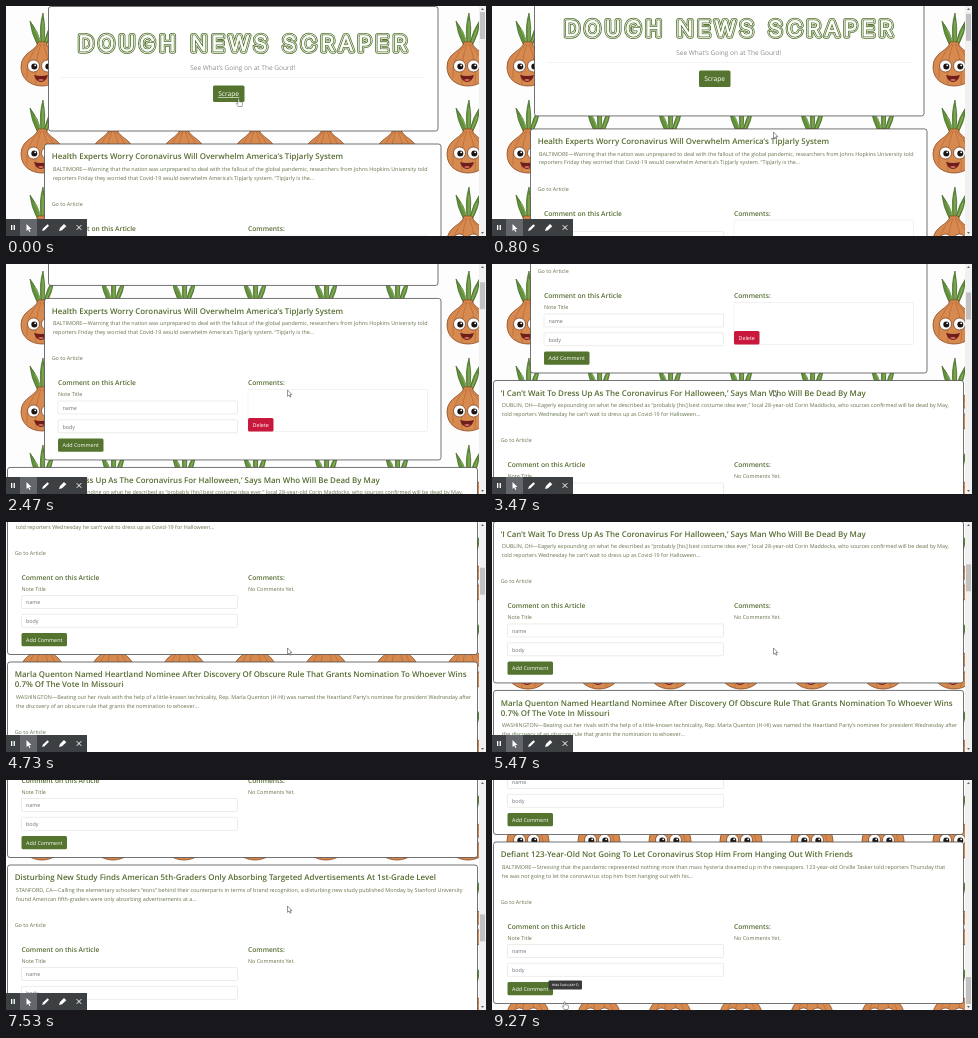
These frames come from a looping animation (480 by 230 pixels, 9340 ms). An HTML page:

```html
<!DOCTYPE html>
<html lang="en">
<head>
<meta charset="utf-8">
<title>News Scraper</title>
<style>
  html, body { margin: 0; width: 100%; height: 100%; overflow: hidden; background: #fdfdfd; }
  svg { display: block; width: 480px; height: 230px; font-family: "Open Sans", "Noto Sans", sans-serif; text-rendering: geometricPrecision; }
  .logo { font: 300 21px Inter, sans-serif; letter-spacing: 4.8px; stroke-linejoin: round; }
</style>
</head>
<body>
<svg id="stage" viewBox="0 0 480 230" xmlns="http://www.w3.org/2000/svg"></svg>
<script>
const LOOP = 9340, GREEN = '#55742f', INK = '#556b2f', SOFT = '#63734a';
const STEP = 169, CARD_H = 161.5, LINE = 10, MAX_SCROLL = 1617;

const rect = (x, y, w, h, fill, r = 0, stroke = 'none', sw = .6) =>
  `<rect x="${x}" y="${y}" width="${w}" height="${h}" rx="${r}" fill="${fill}" stroke="${stroke}" stroke-width="${sw}"/>`;
const text = (x, y, str, size = 5.4, fill = SOFT, attrs = '') =>
  `<text x="${x}" y="${y}" font-size="${size}" fill="${fill}" ${attrs}>${str}</text>`;
const path = (d, fill, stroke = 'none', sw = .7) =>
  `<path d="${d}" fill="${fill}" stroke="${stroke}" stroke-width="${sw}"/>`;
const bold = 'font-weight="600"', middle = 'text-anchor="middle"';

// Each article: headline lines, then two lines of summary
const articles = [
  [['Health Experts Worry Coronavirus Will Overwhelm America’s TipJarly System'],
    'BALTIMORE—Warning that the nation was unprepared to deal with the fallout of the global pandemic, researchers from Johns Hopkins University told',
    'reporters Friday they worried that Covid-19 would overwhelm America’s TipJarly system. “TipJarly is the...'],
  [['‘I Can’t Wait To Dress Up As The Coronavirus For Halloween,’ Says Man Who Will Be Dead By May'],
    'DUBLIN, OH—Eagerly expounding on what he described as “probably [his] best costume idea ever,” local 28-year-old Corin Maddocks, who sources confirmed will be dead by May,',
    'told reporters Wednesday he can’t wait to dress up as Covid-19 for Halloween...'],
  [['Marla Quenton Named Heartland Nominee After Discovery Of Obscure Rule That Grants Nomination To Whoever Wins', '0.7% Of The Vote In Missouri'],
    'WASHINGTON—Beating out her rivals with the help of a little-known technicality, Rep. Marla Quenton (H-HI) was named the Heartland Party’s nominee for president Wednesday after',
    'the discovery of an obscure rule that grants the nomination to whoever...'],
  [['Report: Majority Of Nation’s Soap Now Being Used For First Time'],
    'WASHINGTON—Noting a sharp change in the habits of most households, a report published Thursday found that the majority of the nation’s soap',
    'was being used for the very first time, according to sources...'],
  [['Man Working From Home Discovers He Has Been Living There With Several Other People For The Past Eleven', 'Years'],
    'CHICAGO—Expressing surprise at the number of people seated around his kitchen table, a local man working from home confirmed Tuesday that he had been',
    'living there with several others for more than a decade...'],
  [['Area Couple Agrees To Spend Entire Weekend Looking At Different Wall'],
    'DENVER—Saying the change of scenery would do them both some good, an area couple agreed Friday to spend the entire weekend looking at a',
    'different wall, neighbors confirmed...'],
  [['Disturbing New Study Finds American 5th-Graders Only Absorbing Targeted Advertisements At 1st-Grade Level'],
    'STANFORD, CA—Calling the elementary schoolers “eons” behind their counterparts in terms of brand recognition, a disturbing new study published Monday by Stanford University',
    'found American fifth-graders were only absorbing advertisements at a...'],
  [['Nation’s Dogs Admit They Could Use A Little Time Alone'],
    'BOSTON—Acknowledging that the past few weeks had been a lot to take in, the nation’s dogs admitted Wednesday that they could use a little time',
    'alone in the house, sources reported...'],
  [['Experts Recommend Staying Six Feet Away From Own Opinions'],
    'ATLANTA—Urging the public to take every possible precaution, a panel of experts recommended Thursday that all residents remain at least six feet',
    'away from their own opinions until further notice...'],
  [['Defiant 123-Year-Old Not Going To Let Coronavirus Stop Him From Hanging Out With Friends'],
    'BALTIMORE—Stressing that the pandemic represented nothing more than mass hysteria dreamed up in the newspapers. 123-year-old Orville Tasker told reporters Thursday that',
    'he was not going to let the coronavirus stop him from hanging out with his...'],
];

function card([title, line1, line2], y, first) {
  const left = first ? 38.5 : 1.5, width = first ? 396.5 : 470;
  const extra = (title.length - 1) * LINE, col = first ? 52 : 15.5;
  const field = (fy, label) => rect(col, fy, 231.5 - col, 13, '#fff', 1, '#d9dbd6', .5) + text(col + 4.5, fy + 8.8, label, 5.4, '#6c757d');
  const comments = first
    ? rect(242, 91, 179.5, 42, '#fff', 1, '#e3e5e0', .5) + rect(242, 119.5, 25.5, 13.5, '#c8193c', 1.5) +
      text(254.7, 128.2, 'Delete', 5.4, '#fff', middle)
    : text(242, 97.5, 'No Comments Yet.');
  return `<g transform="translate(0 ${y})">` +
    rect(left, 0, width, CARD_H + extra, '#fff', 2.5, '#444', .75) +
    title.map((s, i) => text(left + 7.2, 15.3 + i * LINE, s, 7.93, INK, bold)).join('') +
    `<g transform="translate(0 ${extra})">` +
    text(left + 8.5, 27, line1) + text(left + 8.5, 35.5, line2) + text(left + 7.2, 62, 'Go to Article') +
    text(col, 86.8, 'Comment on this Article', 6.67, INK, bold) + text(col, 97.6, 'Note Title') +
    field(102.5, 'name') + field(121.3, 'body') +
    rect(col, 140, 45.5, 13.3, GREEN, 1.5) + text(col + 22.7, 148.6, 'Add Comment', 5.4, '#fff', middle) +
    text(242, 86.8, 'Comments:', 6.67, INK, bold) + comments + '</g></g>';
}

function header() {
  const layers = [[5.6, GREEN], [4, '#fff'], [2.6, GREEN], [1, '#fff']];
  return rect(42.5, .5, 389.5, 124.5, '#fff', 2.5, '#444', .75) +
    layers.map(([w, c]) => `<text class="logo" x="239" y="44.6" text-anchor="middle" fill="${c}" stroke="${c}" stroke-width="${w}">DOUGH NEWS SCRAPER</text>`).join('') +
    text(236.7, 64, 'See What’s Going on at The Gourd!', 6.5, '#8b8f88', middle) +
    rect(55, 71.3, 364, .5, '#e6e6e6') +
    rect(207, 79.5, 31.5, 16.5, GREEN, 1.5) + text(222.6, 90, 'Scrape', 6.65, '#fff', middle) +
    `<g id="underline">${rect(212, 91, 21.3, .6, '#fff')}</g>`;
}

function onion() {
  const eye = x => `<circle cx="${x}" cy="60" r="6" fill="#fff" stroke="#6b3a1c" stroke-width=".7"/><circle cx="${x + .8}" cy="60.5" r="3" fill="#1c1512"/><circle cx="${x + 1.7}" cy="59.3" r=".9" fill="#fff"/>`;
  return path('M32 40Q25 27 24 15Q32 25 35 37Q33 20 37 7Q40 22 38 37Q41 24 48 14Q47 28 40 40Z', '#63923c', '#3d6426') +
    path('M35 38Q32 28 29 23M37 37Q37 24 37 15M39 38Q43 29 45 23', 'none', '#a3c067') +
    path('M32 36H40C41 45 57 46 57 61C57 74 46 80 36 80C26 80 15 74 15 61C15 46 31 45 32 36Z', '#d78a50', '#8c4b23', .8) +
    path('M34 38Q19 52 21 72M35 38Q28 56 30 79M37 38Q45 56 43 79M38 38Q53 52 52 72', 'none', '#b7652f') +
    eye(27.5) + eye(41.5) +
    path('M28 69Q35 71 42 69Q40 76 35 76Q30 76 28 69Z', '#6e1f1b') + path('M32 74Q35 72 38 74Q35 76 32 74Z', '#dd6b61');
}

const recorder = () => rect(0, 213, 81, 17, '#3d4043') + rect(14, 213, 17, 17, '#63666a') +
  rect(5, 219, 1.3, 5, '#fff') + rect(7.6, 219, 1.3, 5, '#fff') +
  path('M20.5 218V225L22.2 223.5L23.4 226L24.4 225.5L23.3 223H25.5Z', '#fff') +
  path('M36 225L37 222.5L41.5 218.2L43 219.7L38.5 224.2Z', '#fff') +
  path('M53 225L54 222L58 218L60.3 220.2L56 224.3Z', '#fff') +
  path('M70.7 219.2L75.3 223.8M75.3 219.2L70.7 223.8', 'none', '#fff', 1);

let cardY = 138;
const cards = articles.map((a, i) => {
  const out = card(a, cardY, i === 0);
  cardY += STEP + (a[0].length - 1) * LINE;
  return out;
}).join('');

const $ = id => document.getElementById(id);
$('stage').innerHTML =
  `<defs><pattern id="onions" width="71" height="87" patternUnits="userSpaceOnUse">${onion()}</pattern></defs>` +
  rect(0, 0, 480, 230, '#fdfdfd') + rect(0, 0, 480, 230, 'url(#onions)') +
  `<g id="page">${header()}${cards}</g>` +
  rect(473, 0, 7, 230, '#f1f1f1') + path('M476.5 2L478 4H475ZM476.5 228L478 226H475Z', '#666') +
  `<g id="thumb">${rect(474, 6, 5, 27, '#c1c1c1')}</g>` +
  `<g id="bar">${recorder()}</g>` +
  `<g id="tip">${rect(56.5, 200.5, 33.5, 9, '#3a3a3a', 1)}${text(73.2, 206.2, 'Hide Tools (Alt+T)', 3.2, '#fff', `${bold} ${middle}`)}</g>` +
  `<g id="arrow">${path('M0 0V6.3L1.5 5L2.5 7.2L3.5 6.8L2.5 4.6H4.4Z', '#fff', '#333', .5)}</g>` +
  `<g id="hand">${path('M0 0Q.8 -.6 1.3 .2V2.6L4 3.2Q4.8 3.6 4.5 5L4 7.5H.3L-1.8 4.4Q-1.6 3.4 0 4.4Z', '#fff', '#444', .5)}</g>`;

const scrollKeys = [[0, 0], [600, 0], [1000, 30], [1070, 32], [1530, 59], [1670, 59], [2470, 103.5], [2600, 111],
  [2930, 126], [3070, 126], [3530, 200], [3670, 200], [3870, 240], [4130, 240], [4470, 300], [4670, 300], [4730, 336],
  [4870, 336], [5800, 292], [6070, 292], [6270, 274], [6730, 274], [7000, 680], [7270, 680], [7530, 1087],
  [7670, 1087], [7930, 1370], [8070, 1370], [8400, MAX_SCROLL], [LOOP, MAX_SCROLL]];
const cursorX = [[70, 232], [700, 281.5], [8400, 281.5], [9000, 72], [LOOP, 72]];
const cursorY = [[70, 93], [700, 126], [8400, 126], [9000, 222], [LOOP, 222]];

function valueAt(keys, t) {
  const i = keys.findIndex(k => k[0] > t);
  if (i <= 0) return keys[i ? keys.length - 1 : 0][1];
  const [t0, a] = keys[i - 1], [t1, b] = keys[i];
  return a + (b - a) * (t - t0) / (t1 - t0);
}
const place = (id, x, y) => $(id).setAttribute('transform', `translate(${x} ${y})`);
const show = (id, on) => $(id).setAttribute('visibility', on ? 'visible' : 'hidden');

function draw(t) {
  const offset = valueAt(scrollKeys, t), x = valueAt(cursorX, t), y = valueAt(cursorY, t);
  place('page', 0, -offset);
  place('thumb', 0, offset / MAX_SCROLL * 191);
  const hand = t < 200 || t >= 9000;
  place('hand', x, y);
  place('arrow', x, y);
  show('hand', hand);
  show('arrow', !hand);
  show('underline', t < 200);
  show('tip', t >= 9070);
  show('bar', t < 9270);
}

const began = performance.now();
function tick() {
  draw((performance.now() - began) % LOOP);
  requestAnimationFrame(tick);
}
tick();
</script>
</body>
</html>
```
